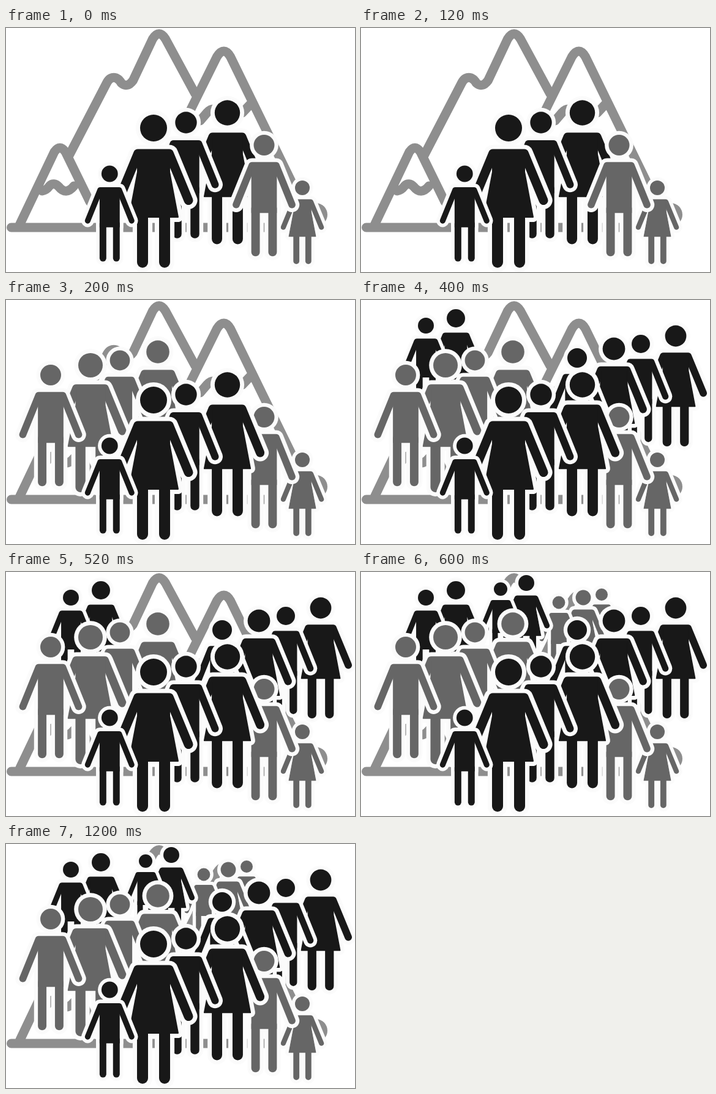
These frames come from a looping animation (570 px wide and 400 px high, 1600 ms). An HTML page with a canvas:

```html
<!DOCTYPE html>
<html lang="en">
<head>
<meta charset="utf-8">
<title>Growing crowd</title>
<style>
html, body { margin: 0; width: 100%; height: 100%; overflow: hidden; background: #fff; }
canvas { display: block; }
</style>
</head>
<body>
<canvas id="stage" width="570" height="400"></canvas>
<script>
const ctx = document.getElementById('stage').getContext('2d');
const LOOP = 1600;
const BLACK = '#181818', GRAY = '#666', ROCK = '#8e8e8e', HALO = '#fbfbfb';
const HEAD = 22; // head radius in figure units

// Back to front: kind, head x, head y, head radius, colour, shown from, shown until
const crowd = [
  ['man', 393, 37, 10, GRAY, 600],
  ['woman', 363, 42, 12.4, GRAY, 600],
  ['man', 323, 50, 10.4, GRAY, 600],
  ['woman', 270, 18, 13, BLACK, 600],
  ['man', 228, 28, 11, BLACK, 600],
  ['woman', 514, 59, 17.4, BLACK, 400],
  ['man', 457, 72, 15, BLACK, 400],
  ['woman', 413, 80, 18.4, BLACK, 400],
  ['man', 353, 95, 16, BLACK, 400],
  ['woman', 155, 30, 15, BLACK, 400],
  ['man', 106, 42, 13, BLACK, 400],
  ['woman', 248, 85, 18.8, GRAY, 200],
  ['man', 186, 99, 16.4, GRAY, 200],
  ['woman', 138, 107, 20, GRAY, 200],
  ['man', 73, 123, 17, GRAY, 200],
  ['girl', 484, 262, 12, GRAY, 0],
  ['man', 421.5, 192, 17, GRAY, 200],
  ['woman', 361.5, 139, 20.7, BLACK, 0],
  ['man', 421.5, 192, 17, GRAY, 0, 200],
  ['man', 294, 155, 17.7, BLACK, 0],
  ['woman', 241, 164, 22, BLACK, 0],
  ['boy', 169.3, 239, 13.4, BLACK, 0]
];

function line(points, width) {
  ctx.lineWidth = width;
  ctx.beginPath();
  points.forEach(([x, y]) => ctx.lineTo(x, y));
  ctx.stroke();
}

// Draws the figure grown outwards by the given amount.
function silhouette(female, grow) {
  const [hand, handY, shoulder, hem] = female ? [57, 118.5, 42, 146] : [59, 126.5, 43.5, 144];
  const foot = female ? 220 : 227;
  ctx.beginPath();
  ctx.arc(0, 0, HEAD + grow, 0, Math.PI * 2);
  ctx.fill();
  line([[-hand, handY], [-25.5, shoulder], [25.5, shoulder], [hand, handY]], 15 + 2 * grow);
  for (const x of [-18, 18]) line([[x, hem - 10], [x, foot]], 18 + 2 * grow);
  const side = female ? [[26, shoulder], [26, 72], [40, hem]] : [[27, shoulder], [27, hem]];
  const mirror = side.map(([x, y]) => [-x, y]).reverse();
  ctx.beginPath();
  [...side, ...mirror].forEach(([x, y]) => ctx.lineTo(x, y));
  ctx.closePath();
  ctx.fill();
  if (grow || female) {
    ctx.lineWidth = 2 * grow + (female ? 2 : 0);
    ctx.stroke();
  }
}

function person(kind, x, y, r, color) {
  const female = kind === 'woman' || kind === 'girl';
  const scale = r / HEAD;
  const halo = (3.8 + r * 0.15) / scale;
  ctx.save();
  ctx.translate(x, y);
  ctx.scale(scale, scale);
  for (const [ink, grow] of [[HALO, halo], [color, 0]]) {
    ctx.fillStyle = ctx.strokeStyle = ink;
    silhouette(female, grow);
  }
  ctx.restore();
}

const ridges = new Path2D(
  // main peak
  'M103.5 208 L164.5 90 Q170 79 180 82 Q186 85 188 90 Q198 99 207.5 86 L239.5 18 Q250 1 260.5 18 L309 108' +
  // right peak and its snow line
  'M302 133 L344.5 47 Q356 29 366.5 47 L476 272 L507 306' +
  'M317 152 L329 138 Q336 131 342 134 M402 122 L386 139' +
  // left peak and its snow line
  'M22.5 322 L79 203 Q88 190 97 203 L137 285' +
  'M59 267 Q66 266 71 259 Q78 252 86 260 Q98 275 111 259' +
  // ground
  'M8.5 327 L500 327'
);

function mountains() {
  ctx.strokeStyle = ctx.fillStyle = ROCK;
  ctx.lineWidth = 15;
  ctx.stroke(ridges);
  ctx.beginPath();
  ctx.arc(506, 306, 19, 0, Math.PI * 2);
  ctx.fill();
}

function draw(t) {
  ctx.fillStyle = '#fff';
  ctx.fillRect(0, 0, 570, 400);
  ctx.lineCap = ctx.lineJoin = 'round';
  mountains();
  for (const [kind, x, y, r, color, from, until = LOOP] of crowd) {
    if (t >= from && t < until) person(kind, x, y, r, color);
  }
}

const start = performance.now();
function tick() {
  draw((performance.now() - start) % LOOP);
  requestAnimationFrame(tick);
}
tick();
</script>
</body>
</html>
```
